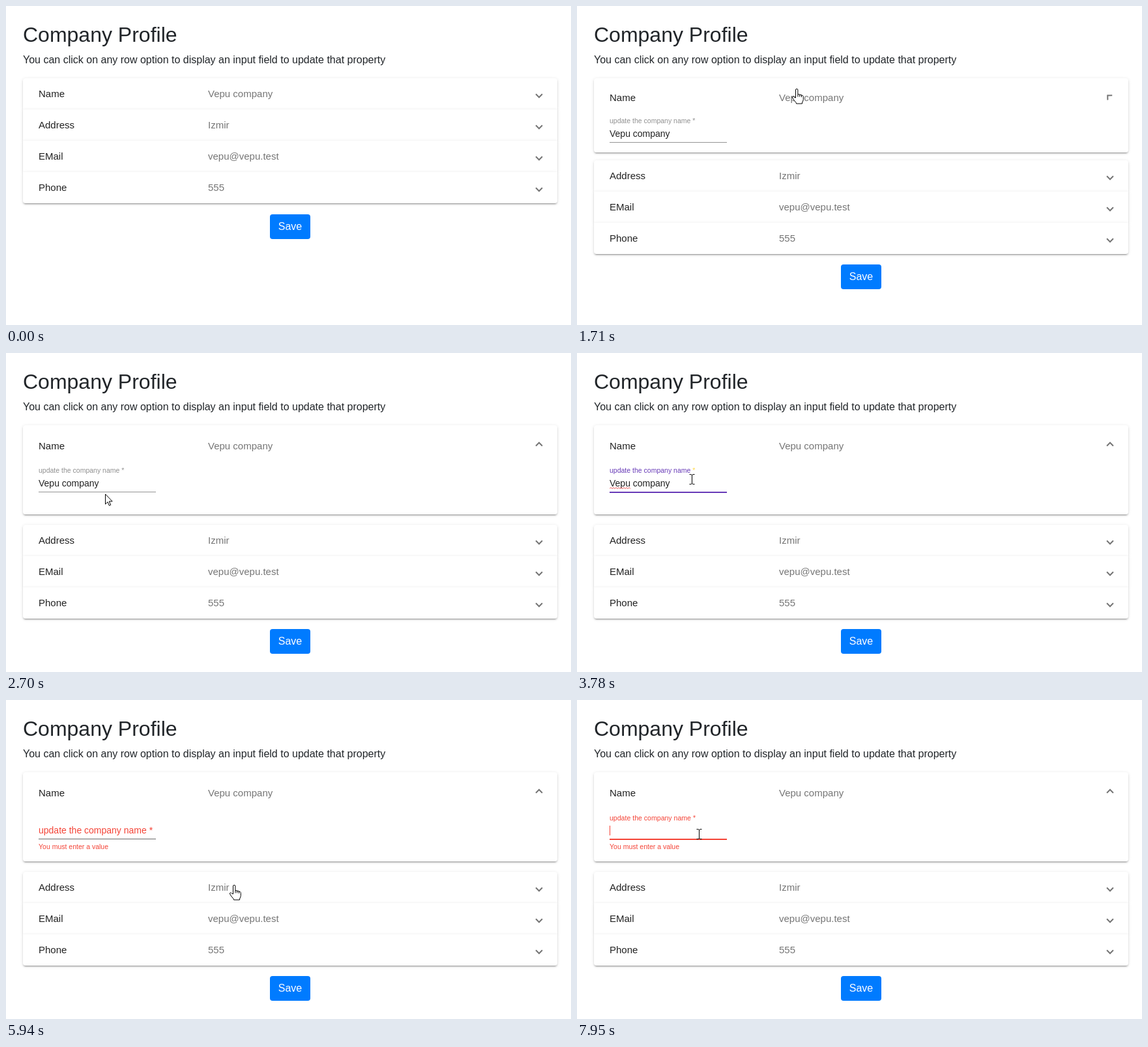
Animation, 867 px wide and 490 px high, one loop 8 s. Source, as an HTML page:

```html
<!DOCTYPE html>
<html lang="en">
<head>
<meta charset="utf-8">
<title>Company Profile</title>
<style>
  html, body { margin: 0; width: 100%; height: 100%; overflow: hidden; background: #fff; }
  body { position: relative; font-family: "Liberation Sans", Arial, sans-serif; color: #212529; }
  h2, p { position: absolute; left: 26px; margin: 0; font-weight: 400; white-space: nowrap; }
  h2 { top: 24px; font-size: 32px; line-height: 40px; }
  p { top: 70px; font-size: 16px; line-height: 25px; }

  #list { --p: 0; position: absolute; left: 26px; top: 111px; width: 820px; }
  .panel {
    position: relative; background: #fff;
    box-shadow: 0 3px 1px -2px rgba(0,0,0,.2), 0 2px 2px rgba(0,0,0,.14), 0 1px 5px rgba(0,0,0,.12);
  }
  .panel:first-child { border-radius: 4px 4px 0 0; margin-bottom: calc(16px * var(--p)); }
  .panel:last-of-type { border-radius: 0 0 4px 4px; }
  .open .panel:first-child { border-radius: 4px; }
  .open .panel:nth-child(2) { border-radius: 4px 4px 0 0; }

  .head { position: relative; height: 48px; line-height: 48px; font-size: 15px; color: rgba(0,0,0,.87); }
  .head span { position: absolute; left: 24px; white-space: nowrap; }
  .head .value { left: 284px; color: rgba(0,0,0,.54); }
  .head i { position: absolute; left: 788px; top: calc(50% - 4px); width: 8px; height: 8px; }
  .head i::after {
    content: ""; position: absolute; left: 0; top: 1.2px; width: 6px; height: 6px;
    border: solid rgba(0,0,0,.54); border-width: 0 2px 2px 0; transform: rotate(45deg);
  }
  .panel:first-child .head { height: calc(48px + 16px * var(--p)); line-height: calc(48px + 16px * var(--p)); }
  .panel:first-child i { transform: rotate(calc(180deg * var(--p))); }

  .body { position: relative; height: calc(73px * var(--p)); overflow: hidden; }
  .body > * { position: absolute; left: 24px; white-space: nowrap; }
  #label { top: 15px; font-size: 14px; line-height: 20px; transform-origin: 0 14.85px; }
  #input { top: 18px; height: 15px; font-size: 14px; line-height: 15px; color: rgba(0,0,0,.87); }
  #input.selected { background: #3297fd; color: #fff; }
  #caret { position: absolute; left: 100%; top: 0; width: 1px; height: 15px; }
  #squiggle { top: 31px; }
  #line { top: 38px; width: 180px; height: 1px; }
  #ripple { top: 38px; width: 180px; height: 2px; }
  #error { top: 45px; font-size: 10.5px; line-height: 11px; color: #f44336; }

  #save {
    position: absolute; left: 379px; top: calc(100% + 17px - 1px * var(--p)); width: 62px; height: 38px;
    border-radius: 4px; background: #007bff; color: #fff; font-size: 16px; line-height: 37px; text-align: center;
  }
  #overlay { position: absolute; left: 0; top: 0; }
</style>
</head>
<body>
<h2>Company Profile</h2>
<p>You can click on any row option to display an input field to update that property</p>
<div id="list"><div id="save">Save</div></div>
<svg id="overlay" width="867" height="490">
  <circle id="click" r="12" fill="#ff0" fill-opacity=".5"/>
  <g id="cursor" fill="#fff" stroke="#000">
    <path id="arrow" d="M.5.8V16.2L4 12.8 6.4 18.4 8.7 17.4 6.3 11.9H11.2Z"/>
    <g id="hand">
      <path d="M.5 14V2a1.7 1.7 0 0 1 3.4 0v6.5l2.7.5 2.6.7 2.3 1q.8.6.8 2v4q-.4 2.5-1.6 4.3l-.2 2H1.5l-.3-1.5-3-3.5-2.6-4q-.6-1.6.8-2 1.2-.1 2.2 1.2z"/>
      <path d="M3.9 8.5v4M6.7 9.2v3.3M9.4 10v3" fill="none"/>
    </g>
    <path id="beam" d="M-3.5-7.5H-1L.5-6.5 2-7.5H4.5M.5-6.5V6.5M-3.5 7.5H-1L.5 6.5 2 7.5H4.5" fill="none"/>
  </g>
</svg>
<script>
const LOOP = 8000, STEP = 77.1;
const COMPANY = 'Vepu company';
const ROWS = [['Name', COMPANY], ['Address', 'Izmir'], ['EMail', 'vepu@vepu.test'], ['Phone', '555']];
const GREY = [143, 143, 143], PURPLE = [103, 58, 183], AMBER = [255, 215, 64], RED = [244, 67, 54];

const FIELD = `<div class="body">
  <div id="input"><span id="text"></span><b id="caret"></b></div>
  <div id="label">update the company name <span id="star">*</span></div>
  <svg id="squiggle" width="34" height="3"><path d="M0 2.5${'l2-2 2 2'.repeat(8)}" fill="none" stroke="#e33" stroke-width=".9"/></svg>
  <div id="line"></div><div id="ripple"></div>
  <div id="error">You must enter a value</div></div>`;

const $ = id => document.getElementById(id);
$('save').insertAdjacentHTML('beforebegin', ROWS.map(([name, value], i) =>
  `<section class="panel"><div class="head"><span>${name}</span><span class="value">${value}</span><i></i></div>${i ? '' : FIELD}</section>`
).join(''));

// Pointer path: step, x, y
const PATH = [
  [2, 395, 500], [6, 368, 206], [8, 368, 206], [15, 335, 127], [27, 335, 127], [30, 154, 239],
  [32, 154, 239], [35, 152, 216], [38, 176, 194], [62, 176, 194], [66, 360, 223], [71, 360, 223],
  [75, 352, 275], [76, 352, 275], [80, 335, 312], [84, 270, 300], [87, 247, 260], [88, 247, 254],
  [91, 208, 226], [93, 208, 226], [97, 187, 206], [105, 187, 206]
];
const CLICKS = [18, 42, 68, 100];
const OPEN_AT = 1589, FOCUS_AT = 3208, BLUR_AT = 5208, REFOCUS_AT = 7660;

function bezier(x1, y1, x2, y2) {
  const at = (a, b, s) => 3 * (1 - s) * (1 - s) * s * a + 3 * (1 - s) * s * s * b + s ** 3;
  return x => {
    if (x <= 0) return 0;
    if (x >= 1) return 1;
    let lo = 0, hi = 1;
    for (let i = 0; i < 24; i++) {
      const mid = (lo + hi) / 2;
      if (at(x1, x2, mid) < x) lo = mid; else hi = mid;
    }
    return at(y1, y2, lo);
  };
}
const standard = bezier(.4, 0, .2, 1), swift = bezier(.25, .8, .25, 1), late = bezier(.55, 0, .55, .2);
const mix = (a, b, k) => a.map((v, i) => v + (b[i] - v) * k);
const rgb = c => `rgb(${c.map(Math.round)})`;
const show = (id, on) => { $(id).style.display = on ? '' : 'none'; };

function pointer(n) {
  const i = Math.max(1, PATH.findIndex(k => k[0] >= n));
  const [a, b] = [PATH[i - 1], PATH[i]];
  const k = Math.max(0, (n - a[0]) / (b[0] - a[0]));
  return [1, 2].map(j => Math.round(a[j] + (b[j] - a[j]) * k));
}

function pointerKind(x, y, open) {
  if (open && x >= 50 && x <= 230 && y >= 186 && y <= 212) return 'beam';
  const onRow = open ? y < 175 || (y >= 264 && y < 408) : y < 303;
  const top = open ? 424 : 320;
  const onSave = x >= 405 && x < 467 && y >= top && y < top + 38;
  return onRow || onSave ? 'hand' : 'arrow';
}

function drawPointer(n, open) {
  const [x, y] = pointer(n);
  const kind = pointerKind(x, y, open);
  for (const id of ['arrow', 'hand', 'beam']) show(id, id === kind);
  show('cursor', n > 2);
  $('cursor').setAttribute('transform', `translate(${x} ${y})`);
  show('click', CLICKS.some(c => n >= c && n < c + 3));
  $('click').setAttribute('cx', x);
  $('click').setAttribute('cy', y);
}

function drawField(n, t) {
  const focus = swift((t - FOCUS_AT) / 400), blur = swift((t - BLUR_AT) / 400);
  const refocus = swift((t - REFOCUS_AT) / 400);
  const focused = t >= FOCUS_AT && t < BLUR_AT, again = t >= REFOCUS_AT;
  const float = 1 - blur + refocus;

  $('label').style.transform = `translateY(${-20.5 * float}px) scale(${1 - .25 * float})`;
  $('label').style.color = rgb(mix(mix(GREY, PURPLE, focus), RED, blur));
  $('star').style.color = rgb(mix(mix(GREY, AMBER, focus), RED, blur));

  const filled = n < 57;
  $('text').textContent = filled ? COMPANY : '';
  $('input').className = n >= 53 && filled ? 'selected' : '';
  show('squiggle', focused && filled);

  show('caret', (n >= 42 && n < 49) || (n >= 57 && n < 64) || n >= 100);
  $('caret').style.background = rgb(again ? RED : PURPLE);

  $('line').style.background = t < BLUR_AT ? '#949494' : '#6b6b6b';
  show('ripple', focused || again);
  $('ripple').style.background = rgb(again ? RED : PURPLE);
  const spread = swift((t - (again ? REFOCUS_AT : FOCUS_AT)) / 300);
  $('ripple').style.transform = `scaleX(${.5 + .5 * spread})`;

  const error = late((t - BLUR_AT) / 300);
  $('error').style.opacity = error;
  $('error').style.transform = `translateY(${-5 * (1 - error)}px)`;
}

function draw(now) {
  const n = Math.floor(now % LOOP / STEP), t = n * STEP;
  const p = standard((t - OPEN_AT) / 225);
  $('list').style.setProperty('--p', p);
  $('list').className = p > 0 ? 'open' : '';
  drawField(n, t);
  drawPointer(n, p > 0);
}

const start = performance.now();
function tick() {
  draw(performance.now() - start);
  requestAnimationFrame(tick);
}
tick();
</script>
</body>
</html>
```
